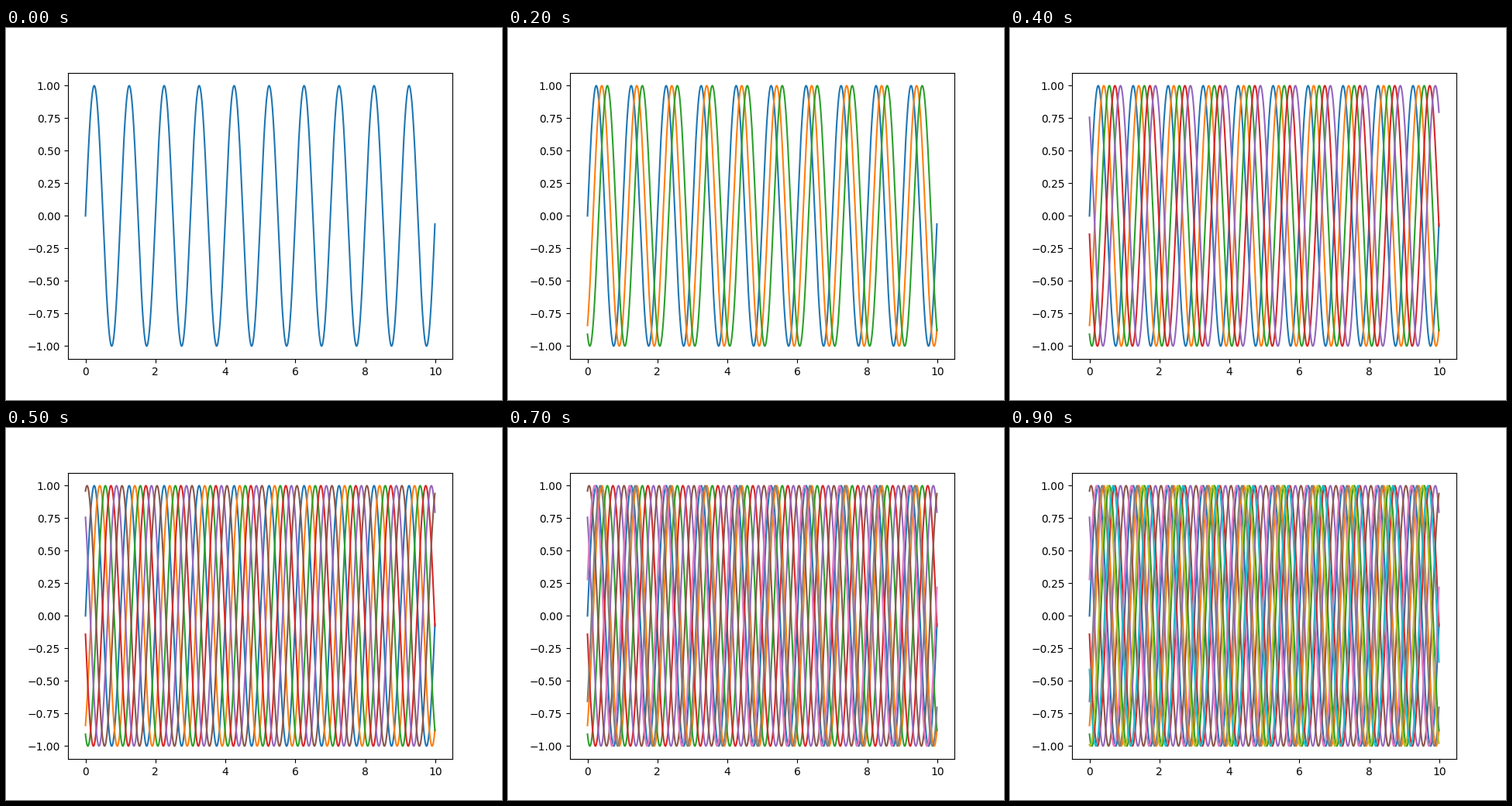
These frames come from a looping animation (640 by 480 pixels, 1 s). A matplotlib script:

```python
import matplotlib.pyplot as plt
import numpy as np
from matplotlib.animation import FuncAnimation

WAVES = 10
INTERVAL_MS = 100

fig, ax = plt.subplots(figsize=(6.4, 4.8), dpi=100)
x = np.arange(0, 10, 0.01)
waves = [ax.plot(x, np.sin(2 * np.pi * x - phase))[0] for phase in range(WAVES)]


def show_waves(frame):
    """Each step adds one more wave, shifted by one radian."""
    for phase, wave in enumerate(waves):
        wave.set_visible(phase <= frame)
    return waves


anim = FuncAnimation(fig, show_waves, frames=WAVES, interval=INTERVAL_MS,
                     init_func=lambda: show_waves(0), repeat=True, repeat_delay=0)
plt.show()
```
